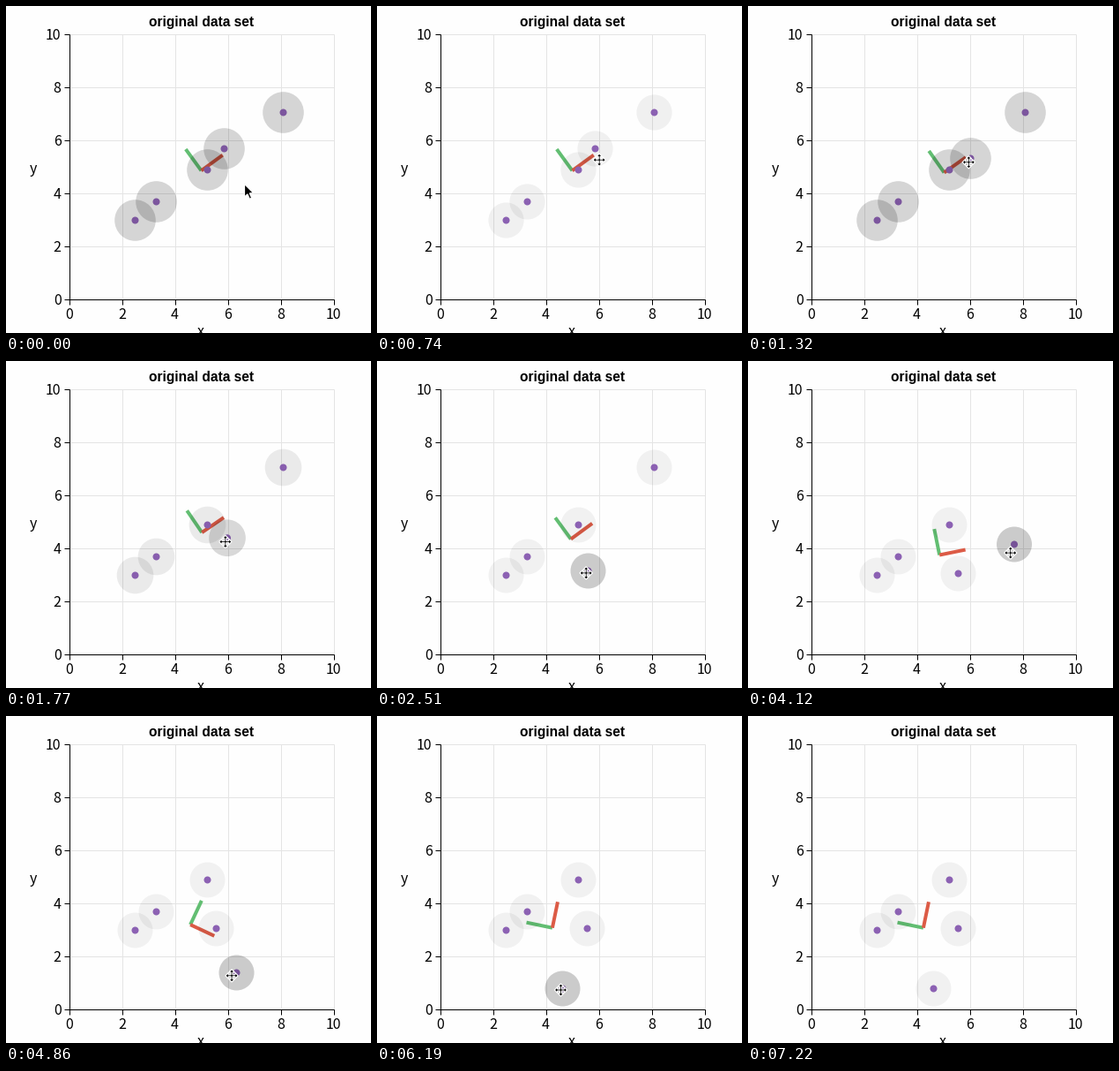
These frames come from a looping animation (414 by 370 pixels, 8000 ms). A matplotlib script:

```python
import numpy as np
import matplotlib.pyplot as plt
from matplotlib.animation import FuncAnimation
from matplotlib.patches import Circle, Polygon

W, H, DPI = 414, 370, 100
INTERVAL, FRAMES = 40, 200
TICK = 147.3            # ms between recorded positions
PX = 72 / DPI           # one pixel in points
LEFT, RIGHT, TOP, BOTTOM, UNIT = 71.5, 371.5, 32.5, 332.5, 30

FONT = "Noto Sans CJK JP"
PURPLE, RED, GREEN = "#9467bd", "#dc5b46", "#62be72"

START = np.array([(146, 242), (170, 221), (228, 185), (247, 161), (314, 120)], float) + 0.5
UPPER, OUTER = 3, 4     # the two points that get dragged

# paths as (tick, x, y)
UPPER_PATH = [(7, 247, 161), (9, 252, 172), (13, 250, 209), (15, 244, 227),
              (17, 239, 237), (18, 238, 240)]
OUTER_PATH = [(23, 314, 120), (24, 317, 121), (25, 316, 122), (27, 309, 180), (29, 294, 234),
              (30, 294, 234), (33, 261, 290), (35, 238, 302), (37, 217, 307),
              (39, 210, 307), (41, 210, 307), (42, 210, 308)]
APPROACH = [(0, 270, 201), (1, 268, 198), (4, 255, 178), (7, 245, 165)]
CROSSING = [(18, 236, 242), (20, 262, 200), (22, 303, 136), (23, 312, 122)]
EXIT = [(44, 208, 308), (45, 209, 318), (47, 212, 346), (49, 216, 395)]

ARROW = np.array([(0, 0), (0, 14.5), (3.4, 11.4), (5.8, 16.8), (8.2, 15.8),
                  (5.8, 10.4), (10.2, 10.2)])
ARM = np.array([(-1, -1), (-1, -3.8), (-3.4, -3.8), (0, -7.2), (3.4, -3.8), (1, -3.8), (1, -1)])


def four_way():
    quarter = np.array([(0, 1), (-1, 0)])
    return np.vstack([ARM @ np.linalg.matrix_power(quarter, n) for n in range(4)])


MOVE = four_way()


def along(path, k):
    t, x, y = np.array(path, float).T
    return np.array([np.interp(k, t, x), np.interp(k, t, y)]) + 0.5


def dragging(path, k):
    """Pointer place while it pulls a point, slightly ahead of it."""
    here = along(path, k)
    return here + (-2, 1.5) + 0.3 * (along(path, k + 1) - here)


def pointer(k):
    if k <= 7:
        return along(APPROACH, k)
    if k < 18:
        return dragging(UPPER_PATH, k)
    if k < 24:
        return along(CROSSING, k)
    if k < 44:
        return dragging(OUTER_PATH, k)
    return along(EXIT, k)


def principal_axis(pts):
    vals, vecs = np.linalg.eigh(np.cov(pts.T))
    v = vecs[:, np.argmax(vals)]
    return v if v[0] >= 0 else -v


# the small surplus keeps the pixel size from rounding down
fig = plt.figure(figsize=((W + 0.01) / DPI, (H + 0.01) / DPI), dpi=DPI, facecolor="#fefefe")
ax = fig.add_axes([0, 0, 1, 1])
ax.set(xlim=(0, W), ylim=(H, 0))
ax.axis("off")


def line(xs, ys, color, width=1, **kw):
    return ax.plot(xs, ys, color=color, lw=width * PX, solid_capstyle="butt", **kw)[0]


def label(x, y, text, size=16, **kw):
    ax.text(x, y, text, fontsize=size * PX, family=FONT, color="black",
            va="baseline", clip_on=True, **kw)


def draw_chart():
    for n in range(0, 11, 2):
        x, y = LEFT + n * UNIT, BOTTOM - n * UNIT
        line([x, x], [TOP, BOTTOM], "#e4e4e4", zorder=1)
        line([LEFT, RIGHT], [y, y], "#e4e4e4", zorder=1)
        line([x, x], [BOTTOM, BOTTOM + 6], "black", zorder=2)
        line([LEFT - 6, LEFT], [y, y], "black", zorder=2)
        label(x, 353.5, str(n), ha="center")
        label(62.5, y + 5.5, str(n), ha="right")
    line([LEFT, LEFT], [TOP, BOTTOM + 0.5], "black", zorder=2)
    line([LEFT, RIGHT + 0.5], [BOTTOM, BOTTOM], "black", zorder=2)
    label(31, 188.5, "y", ha="center")
    label(221, 373, "x", ha="center")
    ax.text(221.5, 23, "original data set", fontsize=15.5 * PX, family="Liberation Sans",
            weight="bold", ha="center", va="baseline")


draw_chart()
green = line([], [], GREEN, 4, zorder=3)
red = line([], [], RED, 4, zorder=3)
dots = [ax.add_patch(Circle(p, 4, fc=PURPLE, lw=0, zorder=4)) for p in START]
handles = [ax.add_patch(Circle(p, 20, fc="black", lw=0, zorder=5)) for p in START]
cursor = ax.add_patch(Polygon(ARROW, closed=True, fc="black", ec="white",
                              lw=1.2 * PX, joinstyle="miter", zorder=6))


def update(frame):
    k = int((frame * INTERVAL + 30) / TICK)
    pts = START.copy()
    pts[UPPER] = along(UPPER_PATH, k)
    pts[OUTER] = along(OUTER_PATH, k)

    pulse = 0.5 + 0.5 * np.cos(2 * np.pi * k / 9) if k < 13.5 else 0
    alphas = np.full(5, 0.05 + 0.11 * pulse)
    alphas[UPPER] = max(alphas[UPPER], np.interp(k, [9, 13, 18, 20], [0, 0.2, 0.2, 0]))
    alphas[OUTER] = max(alphas[OUTER], np.interp(k, [21, 23, 45, 48], [0, 0.2, 0.2, 0]))
    for p, dot, handle, alpha in zip(pts, dots, handles, alphas):
        dot.center = handle.center = tuple(p)
        handle.set_radius(20 + 3.3 * pulse)
        handle.set_alpha(alpha)

    mid, v = pts.mean(axis=0), principal_axis(pts)
    for vec, (dx, dy) in ((red, v), (green, (v[1], -v[0]))):
        vec.set_data([mid[0], mid[0] + UNIT * dx], [mid[1], mid[1] + UNIT * dy])

    tip = pointer(k)
    over = np.hypot(*(pts - tip).T).min() < 20
    cursor.set_xy(tip + (MOVE if over else ARROW))
    return [green, red, *dots, *handles, cursor]


anim = FuncAnimation(fig, update, frames=FRAMES, interval=INTERVAL,
                     repeat=True, repeat_delay=0, blit=False)
plt.show()
```
